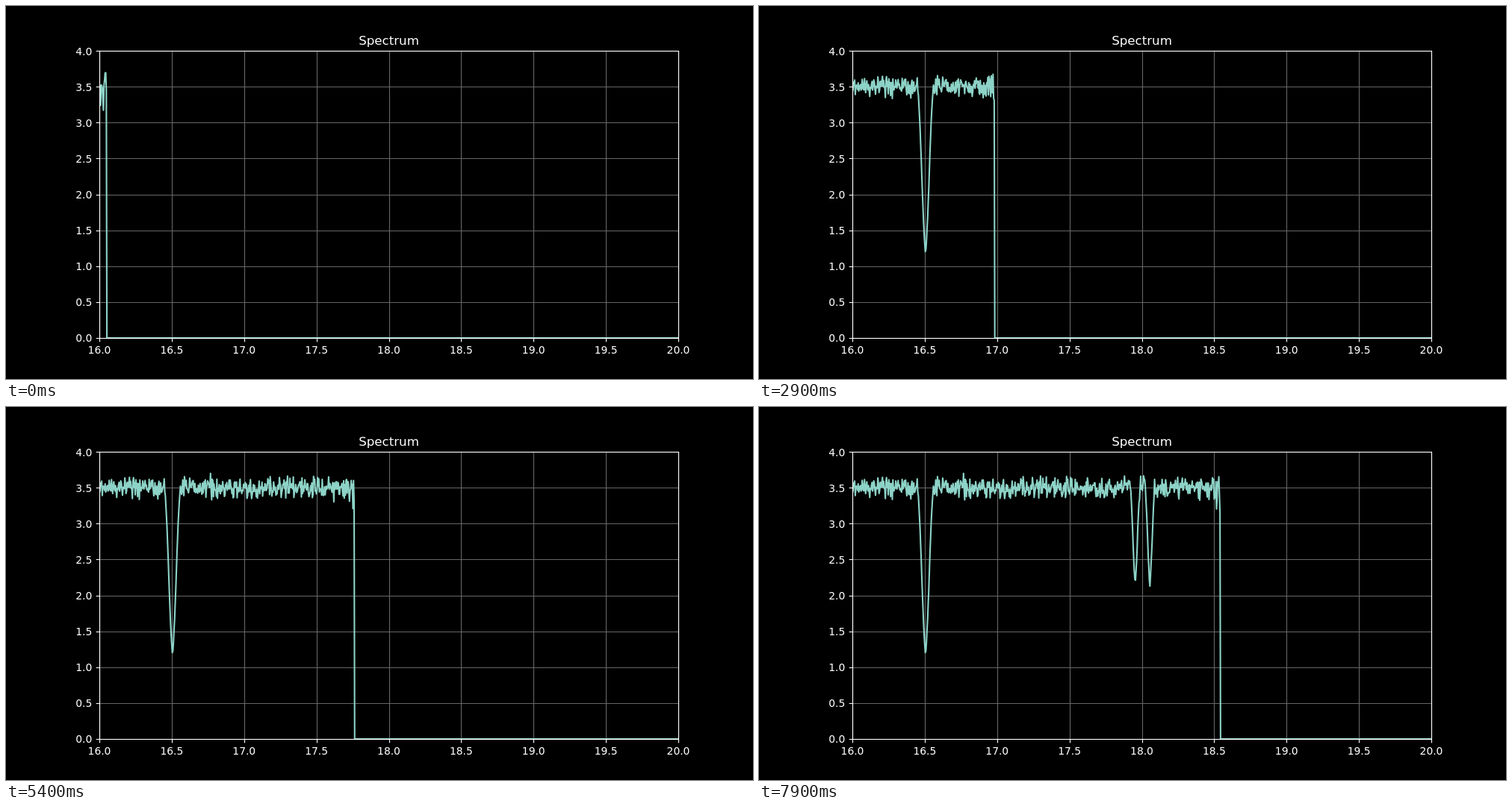
Recreate the animation shown at these times as an HTML page with a canvas. Size 1000 by 500 pixels, loop 8000 ms.

```html
<!DOCTYPE html>
<html lang="en">
<head>
<meta charset="utf-8">
<title>Spectrum</title>
<style>
  html, body { margin: 0; width: 100%; height: 100%; overflow: hidden; background: #000; }
  canvas { display: block; }
</style>
</head>
<body>
<canvas id="stage" width="1000" height="500"></canvas>
<script>
const ctx = document.getElementById('stage').getContext('2d');
const LEFT = 125, TOP = 60, WIDTH = 775, HEIGHT = 385;
const RIGHT = LEFT + WIDTH, BOTTOM = TOP + HEIGHT;
const SAMPLES = 1000, SPACING = WIDTH / SAMPLES;
const STEPS = 80, STEP_MS = 100;
const SETTLE = 7;      // scans averaged before a sample is final
const SCAN_WIDTH = 6.1; // pixels per scan
const BASELINE = 3.5, NOISE = 0.19, FRESH_SHIFT = 2;

const DIPS = [
  { centre: 222.9, half: 10.3, depth: 2.35 },
  { centre: 503.6, half: 6.3, depth: 1.35 },
  { centre: 523.3, half: 6.3, depth: 1.37 }
];

const toY = value => BOTTOM - value * HEIGHT / 4;

// The scan runs slightly faster at first
const frontAt = step => 134.7 + 6.26 * Math.min(step, 28) + 6.045 * Math.max(0, step - 28);

function hash(a, b) {
  const v = Math.sin(a * 12.9898 + b * 78.233) * 43758.5453;
  return v - Math.floor(v);
}

// Roughly normal noise with unit deviation
const noise = (i, seed) =>
  2 * (hash(i, seed) + hash(i + 0.37, seed) + hash(i + 0.71, seed) - 1.5);

function dipAt(x) {
  return DIPS.reduce((sum, { centre, half, depth }) => {
    const u = Math.min(1, Math.abs(x - centre) / half);
    return sum + depth * (1 - u + 0.05 * Math.sin(2 * Math.PI * u));
  }, 0);
}

function sampleValue(i, step, front) {
  const x = LEFT + i * SPACING;
  const scans = 1 + (front - x) / SCAN_WIDTH;
  const settled = scans > SETTLE + 1;
  const dip = dipAt(settled ? x : x - FRESH_SHIFT);
  const spread = NOISE / Math.sqrt(Math.min(scans, SETTLE)) * (dip > 0.1 ? 0.2 : 1);
  return BASELINE - dip + spread * noise(i, settled ? STEPS : step);
}

function line(x0, y0, x1, y1) {
  ctx.beginPath();
  ctx.moveTo(x0, y0);
  ctx.lineTo(x1, y1);
  ctx.stroke();
}

function drawTrace(step) {
  const front = frontAt(step);
  const end = Math.round((front - LEFT) / SPACING);
  ctx.save();
  ctx.beginPath();
  ctx.rect(LEFT, TOP, WIDTH, HEIGHT);
  ctx.clip();
  ctx.beginPath();
  for (let i = 0; i < end; i++) {
    ctx.lineTo(LEFT + i * SPACING, toY(sampleValue(i, step, front)));
  }
  ctx.lineTo(LEFT + end * SPACING, BOTTOM);
  ctx.lineTo(RIGHT, BOTTOM);
  ctx.strokeStyle = '#8dd3c7';
  ctx.lineWidth = 2.083;
  ctx.lineJoin = 'round';
  ctx.stroke();
  ctx.restore();
}

function draw(step) {
  ctx.fillStyle = '#000';
  ctx.fillRect(0, 0, 1000, 500);
  ctx.lineWidth = 1.11;
  const ticks = Array.from({ length: 9 }, (_, k) => ({
    x: Math.round(LEFT + k * WIDTH / 8) + 0.5,
    y: Math.round(BOTTOM - k * HEIGHT / 8) + 0.5,
    labelX: LEFT + k * WIDTH / 8,
    labelY: 450 - 48 * k,
    value: k / 2
  }));

  ctx.strokeStyle = '#666';
  for (const { x, y } of ticks) {
    line(x, TOP, x, BOTTOM);
    line(LEFT, y, RIGHT, y);
  }
  drawTrace(step);

  ctx.strokeStyle = ctx.fillStyle = '#fff';
  ctx.strokeRect(LEFT + 0.5, TOP + 0.5, WIDTH, HEIGHT);
  ctx.font = '13.889px "DejaVu Sans", sans-serif';
  for (const { x, y, labelX, labelY, value } of ticks) {
    line(x, BOTTOM + 0.5, x, BOTTOM + 5.36);
    line(LEFT + 0.5, y, LEFT - 4.36, y);
    ctx.textAlign = 'center';
    ctx.fillText((16 + value).toFixed(1), labelX, 466);
    ctx.textAlign = 'right';
    ctx.fillText(value.toFixed(1), 115.3, labelY);
  }
  ctx.textAlign = 'center';
  ctx.font = '16.667px "DejaVu Sans", sans-serif';
  ctx.fillText('Spectrum', 512.5, 52);
}

function tick() {
  draw(Math.floor(performance.now() / STEP_MS) % STEPS);
  requestAnimationFrame(tick);
}
tick();
</script>
</body>
</html>
```
